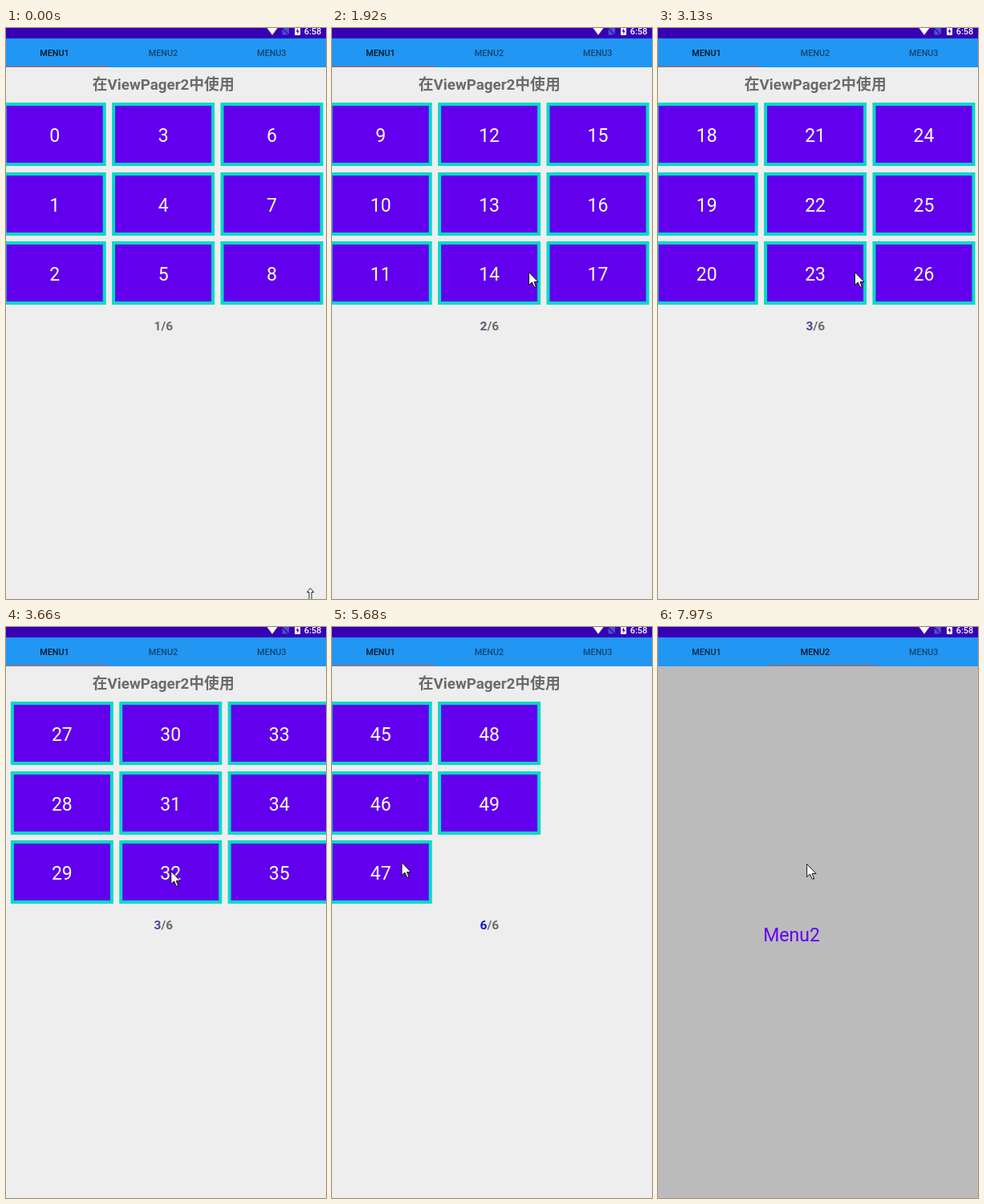
These frames come from a looping animation (399 by 712 pixels, 8000 ms). An HTML page:

```html
<!DOCTYPE html>
<html lang="zh">
<head>
<meta charset="utf-8">
<style>
html, body { margin: 0; width: 100%; height: 100%; overflow: hidden; background: #eee; }
svg { display: block; width: 100vw; height: 100vh; }
text { font-family: Roboto, "Noto Sans CJK SC", "Noto Sans CJK", sans-serif; text-anchor: middle; }
.tab { font-size: 10.8px; font-weight: 500; }
.num, .menu { font-size: 23px; }
.num { fill: #fff; }
.menu { fill: #6200ee; }
.bold { font-weight: 700; fill: #6b6b6b; }
</style>
</head>
<body>
<svg viewBox="0 0 399 712">
  <rect width="399" height="712" fill="#eee"/>
  <g id="pager">
    <text class="bold" x="196.2" y="76.5" font-size="18.8">在ViewPager2中使用</text>
    <g id="grid"></g>
    <text class="bold" x="196.3" y="377" font-size="15.5"><tspan id="count">1</tspan>/6</text>
    <rect x="399.4" y="49" width="1300" height="663" fill="#bbb"/>
    <text class="menu" x="602.2" y="392">Menu2</text>
    <text class="menu" x="1008.4" y="392">Menu3</text>
  </g>
  <rect y="13" width="399" height="36" fill="#2196f3"/>
  <g id="tabs"></g>
  <rect id="bar" y="47.5" width="135.4" height="1.2" fill="#b9634f"/>
  <rect width="399" height="13" fill="#3700b3"/>
  <path d="M325.5 0H338.5L332 8.8Z" fill="#fff"/>
  <path d="M344.500 0H353V8.500H344.500Z" fill="#4a4fd0"/>
  <path d="M344 0L353 9" stroke="#3700b3" stroke-width="1.200"/>
  <rect x="360" y="-2" width="7" height="11" rx="1" fill="#fff"/>
  <path d="M364 .5L361.500 4.600H363.300V7.500L365.700 3.500H364Z" fill="#3700b3"/>
  <text x="382.5" y="8" font-size="11" font-weight="500" fill="#fff">6:58</text>
  <g id="cursor" stroke-linejoin="round">
    <path id="arrow" d="M.5 .5V16.5L4.300 13L7 19H9.500L7 12.500H12Z" fill="#fff" stroke="#111"/>
    <path id="upArrow" d="M4.500 .5L8.700 5.500H6V18H3V5.500H.3Z" fill="#fff" stroke="#223"/>
  </g>
</svg>
<script>
const LOOP = 8000, PAGE = 406.2, COL = PAGE / 3, ROW = 86.5, ITEMS = 50;
const GRID_TIME = 650, TAB_TIME = 510, DRAG = 220, BACK = 400;
const ENTRY = [375, 698], ARRIVE = [270, 303], HOME = [245, 304];

// far: where the drag ends; wait: time until the hand moves back
const gridSwipes = [
  { start: 834, far: [56, 279], wait: 400 },
  { start: 2030, far: [-60, 284], wait: 330 },
  { start: 3140, far: [20, 304], wait: 228 },
  { start: 4060, far: [10, 254], wait: 511 },
  { start: 5010, far: [12, 288], wait: 520 }
];
const tabSwipes = [
  { start: 6220, far: [12, 293], wait: 430 },
  { start: 7050, far: [30, 272], wait: 660 }
];
const backSwipe = { start: 7615 };

const $ = id => document.getElementById(id);
const clamp = v => Math.min(1, Math.max(0, v));
const fling = u => 1 - (1 - u ** 1.5) ** 3;
const mix = (a, b, u) => a.map((v, i) => v + (b[i] - v) * u);

function ease(t, start, time) {
  const u = clamp((t - start) / time);
  return u * u * (3 - 2 * u);
}

function add(parent, tag, attrs, text) {
  const el = document.createElementNS("http://www.w3.org/2000/svg", tag);
  for (const k in attrs) el.setAttribute(k, attrs[k]);
  if (text !== undefined) el.textContent = text;
  parent.append(el);
  return el;
}

for (let i = 0; i < ITEMS; i++) {
  const x = -3.3 + Math.floor(i / 3) * COL, y = 93 + Math.round((i % 3) * ROW);
  add($("grid"), "rect", { x: x + 2, y: y + 2, width: 124, height: 75,
    fill: "#6200ee", stroke: "#03dac5", "stroke-width": 4 });
  add($("grid"), "text", { class: "num", x: x + 64, y: y + 48.5 }, i);
}

const tabs = [0, 1, 2].map(i =>
  add($("tabs"), "text", { class: "tab", x: 60.5 + i * COL, y: 35.3 }, "MENU" + (i + 1)));

// sum of a per-swipe progress function
const total = (swipes, progress) => swipes.reduce((sum, s) => sum + progress(s), 0);

function cursorAt(t) {
  let pos = mix(ENTRY, ARRIVE, ease(t, 40, 450));
  pos = mix(pos, HOME, ease(t, 650, 184));
  for (const { start, far, wait } of [...gridSwipes, ...tabSwipes])
    pos = mix(pos, far, ease(t, start, DRAG) - ease(t, start + wait, BACK));
  return pos;
}

const move = (el, x, y = 0) => el.setAttribute("transform", `translate(${x.toFixed(2)} ${y.toFixed(2)})`);
const show = (el, on) => el.setAttribute("visibility", on ? "visible" : "hidden");

function draw(t) {
  const slide = time => s => fling(clamp((t - s.start) / time));
  const after = time => s => +(t >= s.start + time);

  const tabSlide = slide(TAB_TIME), released = after(TAB_TIME * 0.45);
  const tab = total(tabSwipes, tabSlide) - tabSlide(backSwipe);
  const selected = total(tabSwipes, released) - released(backSwipe);
  move($("grid"), -PAGE * total(gridSwipes, slide(GRID_TIME)));
  move($("pager"), -PAGE * tab);
  $("bar").setAttribute("x", -7 + tab * COL);
  tabs.forEach((el, i) => el.setAttribute("fill-opacity",
    i === selected ? 0.87 : i === 0 ? 0.72 : 0.54));

  const page = total(gridSwipes, after(GRID_TIME));
  $("count").textContent = page + 1;
  $("count").setAttribute("fill", `hsl(243, ${page * 17}%, 42%)`);

  const [x, y] = cursorAt(t), low = y > 690;
  move($("cursor"), x, y);
  show($("upArrow"), low);
  show($("arrow"), !low);
}

const begin = performance.now();
function tick(now) {
  draw(Math.max(0, now - begin) % LOOP);
  requestAnimationFrame(tick);
}
draw(0);
requestAnimationFrame(tick);
</script>
</body>
</html>
```
